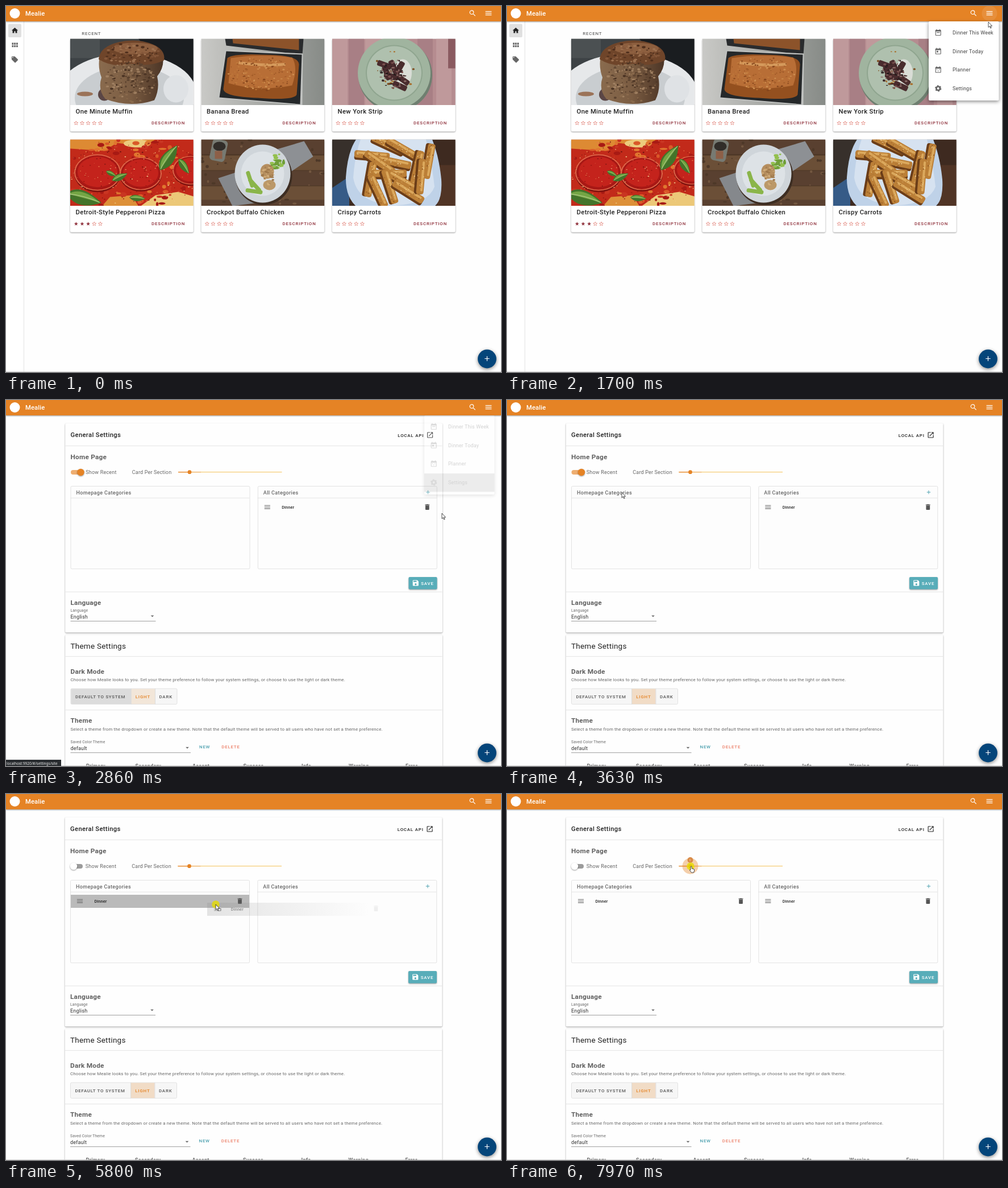
Animation, 871 px wide and 643 px high, one loop 8000 ms. Source, as an HTML page:

```html
<!DOCTYPE html>
<html lang="en">
<head>
<meta charset="utf-8">
<title>Mealie</title>
<style>
html, body { margin: 0; width: 100%; height: 100%; overflow: hidden; background: #fefefe; }
svg { display: block; }
text { font-family: Roboto, sans-serif; white-space: pre; }
.shade { filter: drop-shadow(0 1px 1.2px #0006); }
.deep { filter: drop-shadow(0 2px 3px #0007); }
.photo { filter: blur(.7px); }
</style>
</head>
<body>
<svg id="stage" width="871" height="643" viewBox="0 0 871 643"></svg>
<script>
const icons = {
  search: 'M9.5,3A6.5,6.5 0 0,1 16,9.5C16,11.1 15.4,12.6 14.4,13.7L14.7,14H15.5L20.5,19L19,20.5L14,15.5V14.7L13.7,14.4A6.5,6.5 0 1,1 9.5,3M9.5,5A4.5,4.5 0 1,0 9.5,14A4.5,4.5 0 1,0 9.5,5Z',
  menu: 'M3,6H21V8H3V6M3,11H21V13H3V11M3,16H21V18H3V16Z',
  home: 'M10,20V14H14V20H19V12H22L12,3L2,12H5V20H10Z',
  grid: 'M3,5H8V11H3ZM9.7,5H14.7V11H9.7ZM16.4,5H21.4V11H16.4ZM3,12.7H8V18.7H3ZM9.7,12.7H14.7V18.7H9.7ZM16.4,12.7H21.4V18.7H16.4Z',
  tag: 'M5.5,7A1.5,1.5 0 1,1 5.5,4A1.5,1.5 0 1,1 5.5,7M21.4,11.6L12.4,2.6Q11.8,2 11,2H4Q2,2 2,4V11Q2,11.8 2.6,12.4L11.6,21.4Q13,22.6 14.4,21.4L21.4,14.4Q22.6,13 21.4,11.6Z',
  calendar: 'M19,19H5V8H19M16,1V3H8V1H6V3H5Q3,3 3,5V19Q3,21 5,21H19Q21,21 21,19V5Q21,3 19,3H18V1Z',
  trash: 'M19,4H15.5L14.5,3H9.5L8.5,4H5V6H19M6,19Q6,21 8,21H16Q18,21 18,19V7H6Z',
  open: 'M14,3V5H17.6L7.8,14.8L9.2,16.2L19,6.4V10H21V3M19,19H5V5H12V3H5Q3,3 3,5V19Q3,21 5,21H19Q21,21 21,19V12H19Z',
  save: 'M15,9H5V5H15M12,19A3,3 0 1,1 12,13A3,3 0 1,1 12,19M17,3H5Q3,3 3,5V19Q3,21 5,21H19Q21,21 21,19V7Z',
  caret: 'M7,10L12,15L17,10Z',
  plus: 'M19,13H13V19H11V13H5V11H11V5H13V11H19Z'
};
const orange = '#e58325', wine = '#8f303b', gray = '#666', teal = '#4a9fae';

// Drawing helpers; text and icons are placed by their vertical centre
const rect = (x, y, w, h, fill, more = '') => `<rect x="${x}" y="${y}" width="${w}" height="${h}" fill="${fill}" ${more}/>`;
const oval = (x, y, rx, ry, fill, more = '') => `<ellipse cx="${x}" cy="${y}" rx="${rx}" ry="${ry}" fill="${fill}" ${more}/>`;
const path = (d, fill, more = '') => `<path d="${d}" fill="${fill}" ${more}/>`;
const text = (s, x, y, size, fill, weight = 400, gap = .18) =>
  `<text x="${x}" y="${y + size * .355}" font-size="${size}" font-weight="${weight}" letter-spacing="${gap}" fill="${fill}">${s}</text>`;
const icon = (name, x, y, fill = gray, k = .5625) =>
  path(icons[name], fill, `fill-rule="evenodd" transform="translate(${x} ${y}) scale(${k}) translate(-12 -12)"`);
const group = (id, body, more = '') => `<g id="${id}" ${more}>${body}</g>`;
const line = (x, y, w, fill = '#dedede') => rect(x, y, w, .8, fill);
const caps = (s, x, y, fill, gap = .82) => text(s, x, y, 7.875, fill, 500, gap);

let seed = 7;
const rnd = () => (seed = seed * 16807 % 2147483647) / 2147483647;
function specks(n, x, y, rx, ry, colors, size) {
  let out = '';
  while (n--) {
    const a = rnd() * 6.283, r = Math.sqrt(rnd());
    out += oval(x + rx * r * Math.cos(a), y + ry * r * Math.sin(a), size * (.4 + rnd()), size * (.3 + rnd() * .6), colors[n % colors.length]);
  }
  return out;
}
const bars = (list, w, h, fill, r) => list.map(([x, y, a]) =>
  rect(x - w / 2, y - h / 2, w, h, fill, `rx="${r}" transform="rotate(${a} ${x} ${y})"`)).join('');
const leaf = (x, y, size, turn) => `<g transform="translate(${x} ${y}) rotate(${turn}) scale(${size})">` +
  path('M-20,0Q-8,-16 20,0Q-4,16 -20,0Z', '#43742a') + path('M-18,0Q-6,-12 18,0Z', '#73a544') + path('M-18,0Q0,-3 18,0', 'none', 'stroke="#a3c278"') + '</g>';
const roll = ([x, y, a]) => `<g transform="translate(${x} ${y}) rotate(${a})">` +
  rect(-31, -7, 62, 16, '#6b3d18', 'rx="4"') + rect(-31, -8, 62, 13, '#bb7f37', 'rx="4"') + rect(-27, -6, 53, 4, '#dba85c', 'rx="2"') +
  specks(22, 0, -1, 28, 6, ['#ebca90', '#8d5520', '#c98f45'], 1.1) + '</g>';

const photos = [
  () => rect(0, 0, 217, 117, '#3d4245') + rect(0, 0, 52, 34, '#4b5052') + path('M120,0H217V80L160,50Z', '#1a1d20') +
    oval(100, 96, 122, 70, '#e6e8ea') + oval(104, 104, 96, 56, '#c9cdd0') + oval(186, 88, 22, 24, '#dfe2e5') +
    oval(26, 97, 14, 4, '#9b7358') + oval(60, 98, 11, 11, '#5b4645') +
    path('M52,30Q48,50 55,68Q48,90 62,106Q105,122 148,108Q158,88 153,66Q166,50 163,32Z', 'url(#crumb)') +
    path('M50,36Q52,14 85,6Q120,-2 150,12Q168,22 165,38Q140,50 108,44Q75,52 50,36Z', '#6f452a') + oval(114, 17, 40, 10, '#8d5f3f') +
    specks(190, 106, 76, 46, 36, ['#a08062', '#4b3424', '#8a6a4c', '#5c4330'], 2.2) + specks(90, 107, 26, 52, 18, ['#9d7150', '#4f2f1d', '#84573a'], 2.4),
  () => rect(0, 0, 217, 117, 'url(#steel)') + path('M42,0H180L178,28L44,12Z', '#292b2d') + path('M55,0H172V20L56,8Z', '#8c532a') +
    path('M42,20L179,26L178,117L29,105Z', '#c0c2c0') + path('M44,22L177,28L174,115L32,103Z', '#25282a') +
    path('M46,34Q56,26 108,28Q174,28 172,46L168,98Q164,109 100,104Q39,102 39,88Z', '#94501f') +
    path('M52,34Q100,26 160,33Q171,50 160,82Q100,94 48,78Z', '#b86e36') + path('M66,42Q105,48 148,45', 'none', 'stroke="#d59a5c" stroke-width="5"') +
    specks(190, 105, 62, 58, 30, ['#cf9153', '#85461d', '#c17b3c', '#a35d2a'], 1.6),
  () => rect(0, 0, 217, 117, '#b58c90') + [0, 29, 58, 150, 183].map((x, i) => rect(x, 0, 27, 117, i % 2 ? '#a87f85' : '#bf999b')).join('') +
    rect(204, 0, 13, 52, '#8a5a60') + oval(111, 64, 65, 64, '#6f7f70') + oval(109, 60, 64, 63, '#a0b49f') + oval(109, 60, 50, 49, '#8fa58f') + oval(109, 60, 48, 47, '#afc0ae') +
    specks(24, 112, 56, 38, 36, ['#7d4d20', '#a96c27'], 2.2) + oval(124, 60, 16, 24, '#d9ddd6') +
    bars([[92, 46, 20], [108, 50, 65], [104, 66, 15], [124, 72, 35], [96, 60, 70], [118, 52, 120], [119, 83, 25]], 26, 10, '#4a2c2e', 3) +
    specks(70, 108, 62, 23, 27, ['#7c5250', '#261c1d', '#90706b', '#3a2526'], 2.2),
  () => rect(0, 0, 217, 117, '#c22a1a') + path('M0,0H150L130,12L82,6L60,20L0,16Z', '#dd8a33') + oval(118, 7, 24, 7, '#eccb7c') +
    path('M124,117L150,98L190,92L217,100V117Z', '#ecc878') + path('M56,117L70,101L108,98L120,117Z', '#dd9038') +
    specks(110, 108, 58, 120, 66, ['#d95a28', '#a81a14', '#e0762f', '#c93522'], 5) +
    [[48, 58, 41], [124, 60, 37], [212, 54, 32]].map(([x, y, r]) => oval(x, y + 2, r, r * .8, '#7f120f') + oval(x, y, r, r * .78, '#e0694a') +
      oval(x, y, r - 2, r * .74, '#a81815') + oval(x, y - 1, r - 6, r * .65, '#c4231c')).join('') +
    specks(260, 108, 58, 120, 65, ['#6f1410', '#ea7a4a', '#f0cf90', '#8f140e'], 1.1) +
    leaf(173, 32, 1.35, -55) + leaf(200, 47, .8, 55) + leaf(87, 66, .75, -25) + leaf(72, 60, .5, 25) + leaf(24, 103, 1.6, 15) + leaf(118, 103, .7, 4),
  () => rect(0, 0, 217, 117, '#4a3525') + [0, 28, 55, 82, 106].map((y, i) => rect(0, y, 217, 26, i % 2 ? '#6b4f37' : '#594030')).join('') +
    specks(60, 108, 58, 120, 64, ['#735740', '#4d3828'], 3) +
    path('M117,22L181,3L197,30L150,62Z', '#8d9094') + path('M30,68L85,50L124,108L55,117Z', '#85888c') +
    rect(17, 0, 27, 38, '#777a72', 'rx="6" transform="rotate(12 30 20)"') + oval(32, 12, 11, 8, '#312d29') + rect(24, 20, 13, 14, '#8d5f47') +
    oval(110, 64, 50, 51, '#3d2d22') + oval(108, 60, 49, 51, '#cfd5da') + oval(108, 60, 38, 39, '#dde2e6') +
    bars([[86, 70, 72], [94, 80, 48], [93, 91, 8]], 30, 7, '#8ab54a', 3) +
    specks(22, 134, 38, 13, 13, ['#6f9e38', '#93c04d'], 4) + oval(116, 56, 12, 13, '#b58e5f') + oval(120, 80, 11, 9, '#bb9868') +
    specks(40, 117, 62, 11, 18, ['#a17a4c', '#d0ab77'], 2.2),
  () => rect(0, 0, 217, 117, '#3e2a20') + path('M0,0H48L26,117H0Z', '#37302b') + path('M0,85L30,65L30,117H0Z', '#365b87') + rect(185, 45, 32, 72, '#503425') +
    path('M42,0H176Q188,30 192,70Q195,117 170,122H48Q23,105 24,66Q27,22 42,0Z', '#bfd2e8') +
    path('M50,0H165Q176,45 180,83Q170,112 112,116Q44,113 37,67Q40,27 50,0Z', '#d6e2f0') +
    [[70, 29, 5], [98, 10, 25], [123, 17, 30], [148, 50, 103], [169, 38, 100], [108, 41, 12], [83, 42, 35], [66, 70, 100], [100, 61, 0],
      [124, 75, 30], [100, 83, 72], [133, 93, 32], [79, 91, 65], [155, 65, 95]].map(roll).join('')
];

const starPoints = Array.from({ length: 10 }, (_, i) => {
  const a = i * Math.PI / 5, r = i % 2 ? 1.5 : 3.7;
  return [r * Math.sin(a), -r * Math.cos(a)].map(v => v.toFixed(2));
}).join(' ');
const star = (x, y, full) => `<polygon points="${starPoints}" transform="translate(${x} ${y})" fill="${full ? wine : 'none'}" stroke="${full ? 'none' : '#e07a70'}" stroke-width=".7"/>`;

const dishes = ['One Minute Muffin', 'Banana Bread', 'New York Strip', 'Detroit-Style Pepperoni Pizza', 'Crockpot Buffalo Chicken', 'Crispy Carrots'];
function card(name, i) {
  const x = 113 + i % 3 * 230.5, y = i < 3 ? 57.5 : 234.5;
  return rect(x, y, 216.7, 163, '#fff', 'rx="2.2" class="shade"') +
    `<svg x="${x}" y="${y}" width="216.7" height="116.6" viewBox="0 0 216.7 116.6"><g class="photo">${photos[i]()}</g></svg>` +
    text(name, x + 9.6, y + 128, 11.25, '#222', 500, .36) +
    [0, 1, 2, 3, 4].map(n => star(x + 10.3 + n * 10.65, y + 148.3, i === 3 && n < 3)).join('') +
    caps('DESCRIPTION', x + 143, y + 147.5, wine, .86);
}
const home = rect(0, 27, 31, 616, '#fff') + rect(31, 27, .8, 616, '#dcdcdc') + rect(4, 31.5, 23, 23.5, '#e0e0e0', 'rx="2"') +
  icon('home', 15.5, 43, '#222') + icon('grid', 15.5, 68.5) + icon('tag', 15.5, 94) +
  text('RECENT', 133.3, 47.9, 7.875, '#444', 400, .82) + dishes.map(card).join('');

const item = x => icon('menu', x + 17, 188) + text('Dinner', x + 42.4, 188.3, 7.3, '#222', 500, .14) + icon('trash', x + 298.5, 188, '#555');
const box = (x, title) => rect(x + .5, 151.5, 315, 145.2, '#fdfdfd', 'rx="2" stroke="#dcdcdc" stroke-width=".8"') + line(x, 171.7, 315) + text(title, x + 10, 163, 9, gray, 500, .36);
const heading = (s, y) => text(s, 113, y, 11.8, '#606060', 700, .23);
const select = (label, value, y, w) => text(label, 113, y - 11.5, 6.75, gray, 400, .15) + text(value, 113, y, 9, '#333') + line(113, y + 7, w, '#888') + icon('caret', 107 + w, y - 1.5);
const swatches = [['Primary', 140.5], ['Secondary', 227], ['Accent', 327.5], ['Success', 417], ['Info', 519.5], ['Warning', 602.5], ['Error', 702.5]];

const settings = rect(103.7, 41, 663.8, 367.5, '#fefefe', 'rx="2" class="shade"') + rect(103.7, 412.5, 663.8, 240, '#fefefe', 'rx="2" class="shade"') +
  [80.3, 336.7, 450.3, 544.3].map(y => line(104, y, 663)).join('') +
  text('General Settings', 113, 61, 11.25, '#222', 500, .34) + caps('LOCAL API', 688.8, 62, '#222') + icon('open', 745.6, 61.5, '#222') +
  heading('Home Page', 99.5) + text('Show Recent', 139.8, 127, 9, gray, 400, .2) + text('Card Per Section', 221.3, 126.7, 9, gray, 400, .17) +
  rect(113.5, 123, 21.5, 8, orange, 'id="track" rx="4"') + oval(0, 127, 12, 12, '#777', 'id="ripple"') + oval(131, 127, 6.2, 6.2, orange, 'id="knob" class="shade"') +
  rect(302.5, 126, 182.5, 1.2, '#f6cb70') + rect(302.5, 126, 40, 1.2, '#efae5e') + rect(302.5, 126, 20, 1.2, orange) +
  oval(322.5, 126.7, 0, 0, orange, 'id="halo" opacity=".38"') + group('bubble', oval(322.5, 116, 5, 5, '#d98b48') + text('6', 320.7, 116, 5, '#f6d3ae')) + oval(322.5, 126.7, 3.4, 3.4, orange) +
  box(113, 'Homepage Categories') + box(442.3, 'All Categories') + icon('plus', 742, 162, teal, .46) +
  rect(114, 177, 314, 23, '#bababa', 'id="drop"') + group('left', item(113)) + group('right', item(442.3)) +
  rect(708, 311, 50, 21.5, '#58adb9', 'rx="2" class="shade"') + icon('save', 720.3, 321.5, '#fff') + caps('SAVE', 729.7, 321.8, '#fff') +
  heading('Language', 355.7) + select('Language', 'English', 381, 150) +
  text('Theme Settings', 113, 432, 13.5, '#222', 400, .24) + heading('Dark Mode', 476.5) +
  text('Choose how Mealie looks to you. Set your theme preference to follow your system settings, or choose to use the light or dark theme.', 113, 491.5, 7.875, gray) +
  rect(113.5, 507, 187, 27.5, '#f6f6f6', 'rx="2" stroke="#dcdcdc" stroke-width=".8"') + rect(114, 507.4, 105.5, 26.7, '#dcdcdc', 'id="system"') +
  rect(219.7, 507.4, 41.8, 26.7, '#f1dcc6', 'id="light"') + rect(219.3, 507, .8, 27.5, '#d8d8d8') + rect(261.5, 507, .8, 27.5, '#d8d8d8') +
  caps('DEFAULT TO SYSTEM', 121.5, 521, '#555', .74) + caps('LIGHT', 227.3, 521, orange) + caps('DARK', 269, 521, '#555') +
  heading('Theme', 563) +
  text('Select a theme from the dropdown or create a new theme. Note that the default theme will be served to all users who have not set a theme preference.', 113, 578, 7.875, gray) +
  select('Saved Color Theme', 'default', 612.3, 211.5) + caps('NEW', 339.6, 609.7, teal, .75) + caps('DELETE', 378.7, 609.7, '#ec8069') +
  swatches.map(([s, x]) => text(s, x, 643, 9, gray, 700, .27)).join('');

const calendar = (y, inner) => icon('calendar', 758.7, y) + inner;
const cog = `<g transform="translate(758.7 144.8)" fill="none" stroke="${gray}"><circle r="3.3" stroke-width="2.7"/><circle r="5" stroke-width="1.4" stroke-dasharray="2.62"/></g>`;
const menu = rect(742, 27, 123.5, 139, '#fff', 'rx="2" class="deep"') + rect(742, 129, 123.5, 32.3, '#000', 'id="row"') +
  calendar(47, rect(756, 46, 5.5, 1.2, gray)) + calendar(79.7, rect(756, 78.7, 2.8, 2.8, gray)) +
  calendar(112.3, rect(756, 111, 1.2, 1.2, gray) + rect(760, 111, 1.2, 1.2, gray) + rect(758, 113.5, 1.2, 1.2, gray)) + cog +
  ['Dinner This Week', 'Dinner Today', 'Planner', 'Settings'].map((s, i) => text(s, 784, 47.3 + i * 32.5, 9, '#444', 400, .16)).join('');

const pointer = group('arrow', path('M0,0V9.5L2.2,7.5L3.8,11L5.2,10.4L3.7,7.1H6.6Z', '#fff', 'stroke="#222" stroke-width=".8"') +
    group('grip', rect(4.5, 7.5, 4.5, 3.5, '#eee', 'stroke="#444" stroke-width=".7"'))) +
  group('hand', path('M1,0Q2.2,0 2.2,1.2V4L6,5Q7,5.5 6.5,8L5.5,11H1.5L-1.5,7L-.8,6L0,6.6V1.2Q0,0 1,0Z', '#fff', 'stroke="#222" stroke-width=".8"'));

const stage = document.getElementById('stage');
stage.innerHTML = `<defs><linearGradient id="steel"><stop stop-color="#c9c9c6"/><stop offset="1" stop-color="#878b87"/></linearGradient>
  <linearGradient id="crumb"><stop stop-color="#8a6b4e"/><stop offset=".5" stop-color="#7a5c42"/><stop offset="1" stop-color="#4c3526"/></linearGradient>
  <linearGradient id="fade"><stop stop-color="#888" stop-opacity=".22"/><stop offset="1" stop-color="#888" stop-opacity="0"/></linearGradient></defs>` +
  rect(0, 0, 871, 643, '#fefefe') + group('home', home) + group('settings', settings) + line(0, 642.2, 871, '#d0d0d0') +
  rect(0, 0, 871, 27, orange, 'class="shade"') + oval(15.5, 13, 9, 9, '#fff') + text('Mealie', 34, 13.5, 11.25, '#fff', 500, .1) +
  icon('search', 821, 12.7, '#fff', .6) + oval(849, 13, 13.5, 13.5, '#fff', 'id="hover"') + icon('menu', 849, 12.7, '#fff', .6) +
  oval(846.5, 620, 16.4, 16.4, '#04457a', 'class="deep"') + icon('plus', 846.5, 619.5, '#fff', .6) +
  group('menu', menu) +
  group('status', rect(0, 632, 97, 11, '#292c30') + '<text x="1" y="641" font-size="6.45" fill="#eee" style="font-family:\'Noto Sans\',sans-serif">localhost:9920/#/settings/site</text>') +
  group('ghost', rect(-15, -3, 286, 23, 'url(#fade)') + icon('menu', 2, 8, '#999') + text('Dinner', 26.8, 8, 7.3, '#888', 500, .14) + icon('trash', 282, 7, '#eee')) +
  oval(0, 0, 6.8, 6.8, '#e6dc00', 'id="press" opacity=".8"') + group('pointer', pointer);

const at = {};
stage.querySelectorAll('[id]').forEach(e => at[e.id] = e);
const set = (id, attrs) => { for (const k in attrs) at[id].setAttribute(k, attrs[k]); };
const show = (id, on) => at[id].style.display = on ? '' : 'none';
const ramp = (t, a, b) => Math.min(1, Math.max(0, (t - a) / (b - a)));
const within = (t, spans) => spans.some(([a, b]) => t >= a && t < b);

// Pointer tip: time, x, y
const route = [[440, 717, 640], [1230, 846, 38], [1320, 848, 10], [1600, 848, 12], [1700, 847, 28], [2090, 812, 122], [2350, 798, 140],
  [2720, 798, 140], [2860, 767, 199], [3010, 740, 205], [3790, 137, 157], [4100, 121, 129], [4410, 121, 129], [4710, 366, 186],
  [5000, 461, 186], [5320, 462, 189], [5640, 462, 189], [5800, 369, 194], [6200, 369, 186], [6500, 369, 186], [7280, 323, 127], [8000, 323, 127]];
const presses = [[1430, 1530], [2450, 2560], [4250, 4410], [4950, 6150], [7890, 8000]];
const hands = [[1300, 1640], [2160, 2780], [4080, 4450], [7250, 8000]];
function tip(t) {
  const i = Math.max(1, route.findIndex(p => p[0] > t)), [a, x, y] = route[i - 1], [b, u, v] = route[i];
  const k = ramp(t, a, b), e = k * k * (3 - 2 * k);
  return [x + (u - x) * e, y + (v - y) * e];
}

function render(t) {
  const onHome = t < 2780, off = t >= 4410, dragging = within(t, [[5080, 6150]]), [x, y] = tip(t);
  show('home', onHome);
  show('settings', !onHome);
  set('settings', { transform: `translate(${t < 2930 ? .5 : 0} 0)` });

  const grow = ramp(t, 1470, 1600), fade = 1 - ramp(t, 2780, 2885);
  show('menu', grow > 0 && fade > 0);
  set('menu', { opacity: grow * fade, transform: `translate(${onHome ? 0 : -6} 0) translate(865 27) scale(${.6 + .4 * grow}) translate(-865 -27)` });
  set('row', { opacity: t < 2180 ? 0 : .05 + .26 * ramp(t, 2450, 2600) });
  set('hover', { opacity: .1 * ramp(t, 1300, 1380) * (1 - ramp(t, 1750, 2000)) });
  show('status', within(t, [[2250, 3100]]));

  set('system', { opacity: 1 - ramp(t, 2930, 3080) });
  set('light', { opacity: .6 + .4 * ramp(t, 2930, 3080) });
  const slide = ramp(t, 4410, 4560);
  set('track', { fill: off ? '#9b9b9b' : orange, opacity: off ? 1 : .65 });
  set('knob', { cx: 131 - 12 * slide, fill: off ? '#fff' : orange });
  set('ripple', { cx: 131 - 12 * slide, opacity: off ? .65 * (1 - ramp(t, 4950, 5100)) : 0 });

  const moved = t >= 5720;
  show('drop', moved && dragging);
  show('left', moved);
  show('right', !moved || t >= 6150);
  show('ghost', dragging);
  set('ghost', { transform: `translate(${x} ${y})` });

  const halo = 10 * ramp(t, 7300, 7430) + 4 * ramp(t, 7890, 7970), pop = ramp(t, 7880, 7970);
  set('halo', { rx: halo, ry: halo });
  set('bubble', { opacity: pop, transform: `translate(322.5 126.7) scale(${pop}) translate(-322.5 -126.7)` });

  const hand = within(t, hands);
  show('pointer', t >= 440);
  show('arrow', !hand);
  show('hand', hand);
  show('grip', dragging);
  show('press', within(t, presses));
  set('press', { cx: x, cy: y });
  set('pointer', { transform: `translate(${x} ${y})` });
}
const start = performance.now();
function tick() {
  render((performance.now() - start) % 8000);
  requestAnimationFrame(tick);
}
tick();
</script>
</body>
</html>
```
